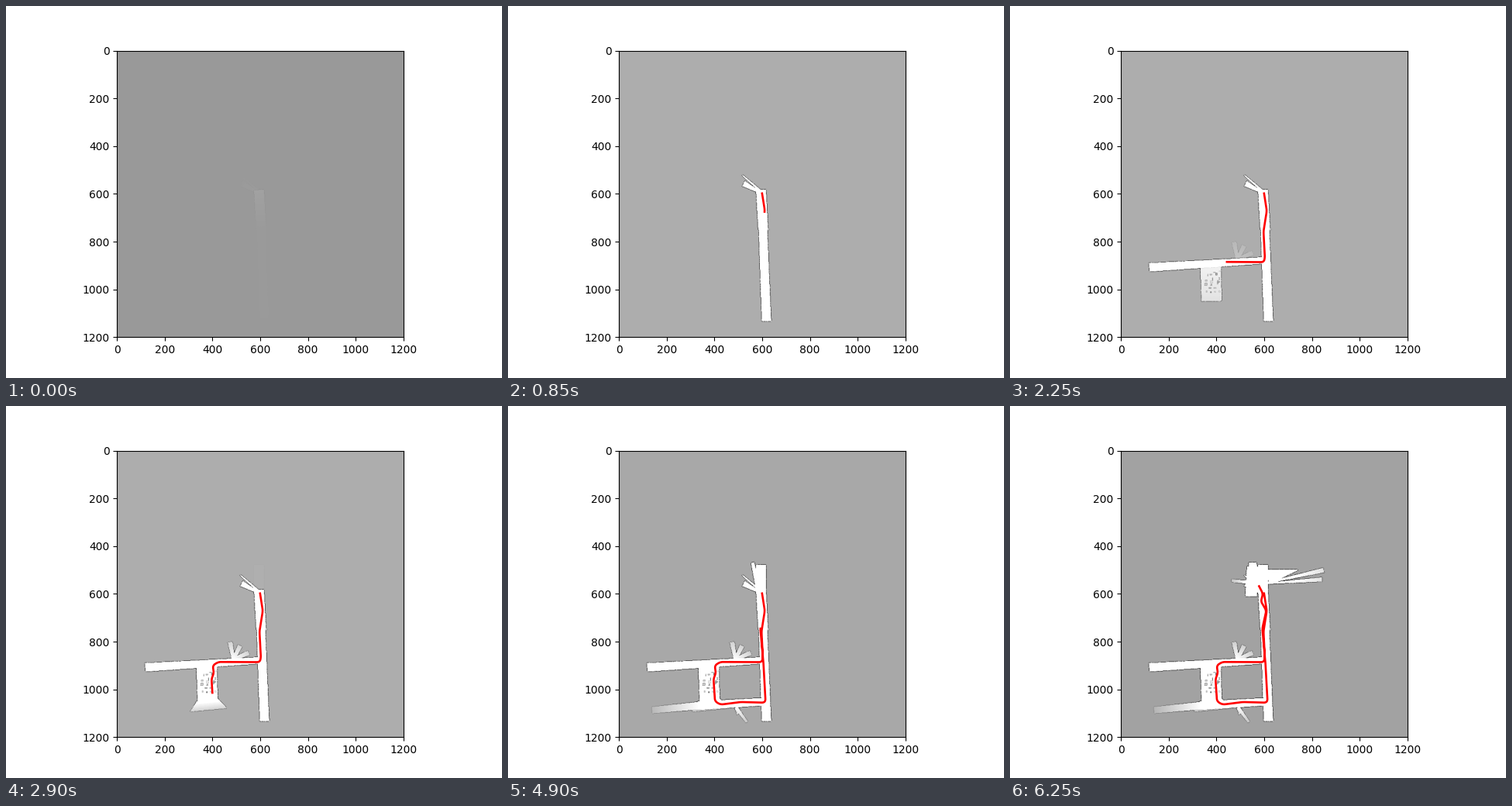
These frames come from a looping animation (640 px wide and 480 px high, 6300 ms). A matplotlib script:

```python
import numpy as np
import matplotlib.pyplot as plt
from matplotlib.animation import FuncAnimation

FRAMES, STEP = 126, 50
SIZE, CELL = 1200, 2
N = SIZE // CELL
rng = np.random.default_rng(4)
gy, gx = np.mgrid[0:N, 0:N] * CELL + CELL / 2

fig = plt.figure(figsize=(6.4, 4.8), dpi=100)
ax = fig.add_subplot()
view = ax.imshow(np.zeros((N, N)), cmap="gray", vmin=0, vmax=1,
                 extent=(0, SIZE, SIZE, 0))
trail, = ax.plot([], [], color="red", lw=1.9)
ax.set_xlim(0, SIZE)
ax.set_ylim(SIZE, 0)

beams = []


def beam(a, b, wa, wb, start, full, near=1.0, far=None):
    """Free strip from a to b; near and far set how fast its ends clear."""
    far = near if far is None else far
    dx, dy = b[0] - a[0], b[1] - a[1]
    long = np.hypot(dx, dy)
    u = ((gx - a[0]) * dx + (gy - a[1]) * dy) / long**2
    v = ((gy - a[1]) * dx - (gx - a[0]) * dy) / long
    mask = (u >= 0) & (u <= 1) & (abs(v) <= (wa + (wb - wa) * u) / 2)
    rows, cols = (np.flatnonzero(mask.any(k)) for k in (1, 0))
    box = np.s_[rows[0]:rows[-1] + 1, cols[0]:cols[-1] + 1]
    gain = np.where(mask, near + (far - near) * u, 0)[box]
    beams.append((box, gain, start, full))


# main corridor and the doorway beside it
beam((595, 585), (604, 750), 42, 41, -10, 650, 42, 5)
beam((603, 745), (618, 1134), 36, 39, -10, 650, 5, 2)
beam((616, 750), (627, 750), 9, 9, -10, 650, 0.6)
beam((594, 590), (517, 523), 10, 5, -10, 650, 12, 0.6)
beam((585, 592), (522, 558), 10, 25, -10, 650, 16, 6)

# left corridor, with a small room above it
beam((592, 880), (119, 909), 28, 36, 1350, 2500, 12, 1.5)
for end in [(474, 803), (516, 818), (552, 848)]:
    beam((488, 875), end, 14, 20, 2000, 2600, 1, 0.5)

# cluttered room
beam((376, 898), (380, 1050), 86, 84, 1500, 2500, 1.3, 1)
beam((380, 1045), (384, 1087), 90, 155, 2300, 2900, 1.2, 0.5)

# bottom corridor
beam((602, 1053), (330, 1069), 32, 36, 2900, 3450, 1.5, 1)
beam((335, 1069), (139, 1088), 32, 27, 2900, 3500, 1, 0.2)
beam((490, 1076), (536, 1138), 16, 10, 3050, 3600, 1, 0.4)
beam((492, 1076), (497, 1105), 9, 9, 3050, 3600, 0.6)

# top of the main corridor
beam((595, 595), (595, 480), 42, 42, 2700, 4900)
beam((585, 590), (560, 470), 20, 14, 2900, 4900)

# upper hall
beam((569, 595), (572, 488), 94, 88, 5250, 5850)
beam((546, 590), (546, 612), 48, 46, 5250, 5850)
beam((549, 492), (548, 470), 26, 26, 5250, 5850)
beam((614, 530), (740, 501), 62, 4, 5450, 6100)
beam((616, 554), (849, 502), 6, 20, 5850, 6200, 1.3, 0.7)
beam((616, 557), (842, 541), 6, 18, 5850, 6200, 1.3, 0.7)
beam((525, 552), (464, 546), 14, 12, 5400, 6100, 1, 0.4)

# furniture in the room and gaps in the walls
keep = np.ones((N, N))
for x, y in rng.uniform((338, 915), (412, 1015), (22, 2)) / CELL:
    w, h = rng.integers(2, 7, 2)
    keep[int(y):int(y) + h, int(x):int(x) + w] *= rng.uniform(0.2, 0.8)
solid = 0.55 * (rng.random((N, N)) > 0.15)

# driven route: arrival time of each leg and its turning points
legs = [
    (550, [(599, 595)]),
    (1550, [(611, 670), (597, 757), (603, 865)]),
    (3900, [(599, 886), (425, 885), (401, 900), (406, 933), (396, 955),
            (402, 1050), (425, 1064), (509, 1053), (608, 1056), (614, 1052)]),
    (4900, [(606, 900), (592, 745)]),
    (6250, [(609, 670), (586, 632), (595, 600), (577, 565)]),
]
stops = np.array([p for _, leg in legs for p in leg], float)
length = np.r_[0, np.cumsum(np.hypot(*np.diff(stops, axis=0).T))]
arrive = [t for t, _ in legs]
travel = length[np.cumsum([len(leg) for _, leg in legs]) - 1]


def smooth(c, win=25):
    padded = np.pad(c, win // 2, mode="edge")
    return np.convolve(padded, np.ones(win) / win, "valid")


dist = np.arange(0, length[-1] + 1)
route = np.array([smooth(np.interp(dist, length, c)) for c in stops.T])


def draw(i):
    t = i * STEP
    free = np.zeros((N, N))
    for box, gain, start, full in beams:
        if t > start:
            p = min((t - start) / (full - start), 1) ** 1.5
            part = free[box]
            np.maximum(part, np.minimum(gain * p, 1), out=part)
    free *= keep
    edge = np.max([np.roll(free, s, k) for s in (-1, 1) for k in (0, 1)],
                  axis=0) - free
    unknown = np.interp(t, [0, 50, 1550, 3900, 6250],
                        [153, 172, 174, 171.5, 162]) / 255
    view.set_data(unknown + (1 - unknown) * free
                  - solid * np.maximum(edge, 0))
    done = int(np.interp(t, arrive, travel))
    trail.set_data(*route[:, :done + 1 if done else 0])
    return [view, trail]


anim = FuncAnimation(fig, draw, frames=FRAMES, interval=STEP, repeat=True,
                     repeat_delay=0)
plt.show()
```
